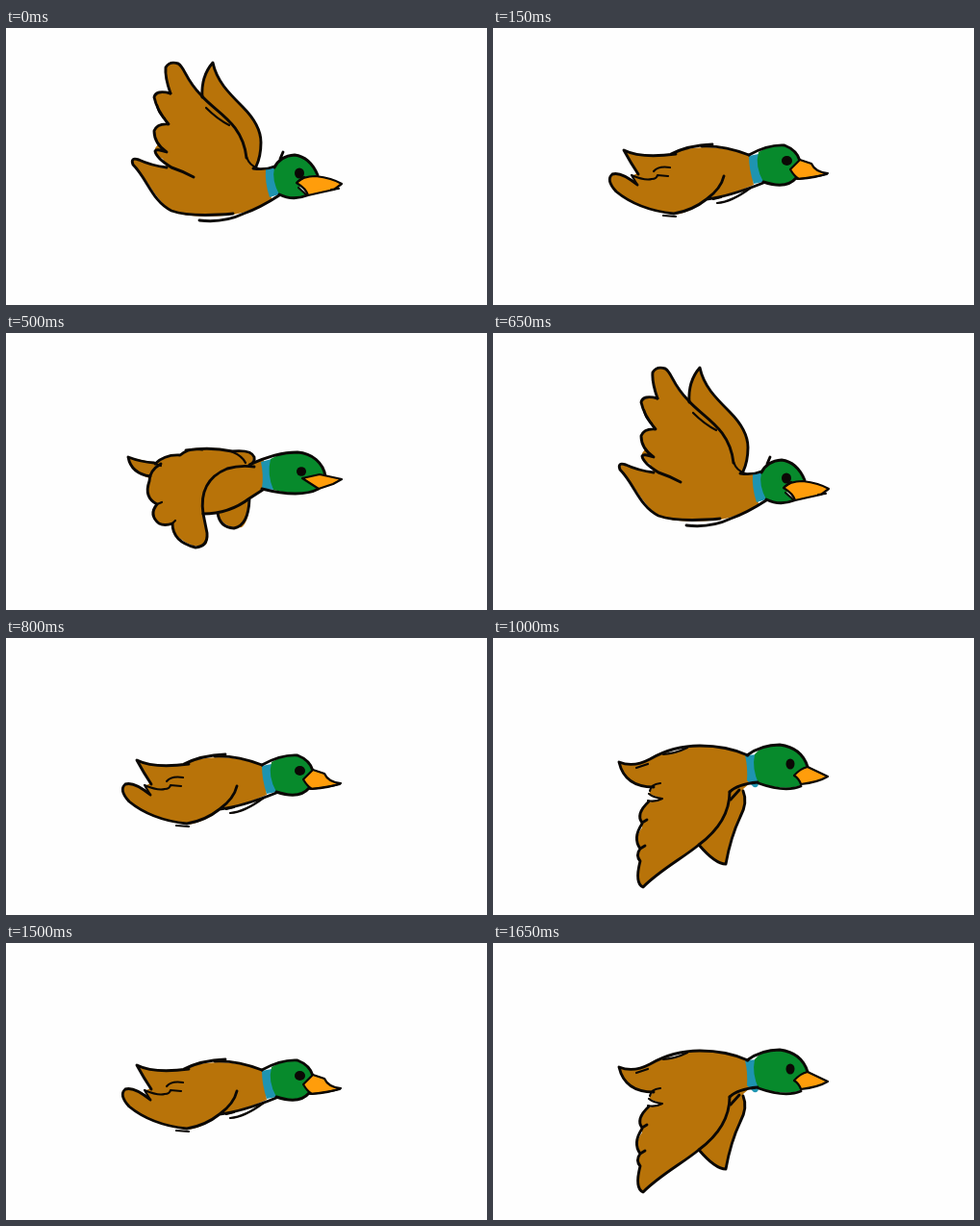
Recreate the animation shown at these times as an HTML page without scripts. Size 500x288 px, loop 1.8 s.

```html
<!DOCTYPE html>
<html lang="en">
<head>
<meta charset="utf-8">
<title>Flying duck</title>
<style>
html, body { margin: 0; width: 100%; height: 100%; overflow: hidden; background: #fefefe; }
svg { display: block; width: 100vw; height: 100vh; }
path { fill: none; stroke: none; }
.body { fill: #b87309; }
.head { fill: #078a2c; }
.ring { fill: #1e94b0; }
.bill { fill: #ff9d0b; }
.gap { fill: #fefefe; }
.ink, .bill { stroke: #0b0805; stroke-width: 2.9; stroke-linecap: round; stroke-linejoin: round; }
.bill { stroke-width: 2.2; }
.thin { stroke-width: 2.2; }
.eye { fill: #0b0805; }

/* Each pose is held, then cut to the next */
.pose { visibility: hidden; animation: 1.8s step-end infinite; }
.up { animation-name: up; }
.glide { animation-name: glide; }
.down { animation-name: down; }
.tuck { animation-name: tuck; }
@keyframes up {
  0%, 36.111%, 72.222% { visibility: visible; }
  8.333%, 44.444%, 83.333%, 100% { visibility: hidden; }
}
@keyframes glide {
  8.333%, 44.444%, 83.333% { visibility: visible; }
  0%, 16.666%, 55.555%, 91.666%, 100% { visibility: hidden; }
}
@keyframes down {
  16.666%, 55.555%, 91.666% { visibility: visible; }
  0%, 27.777%, 63.888%, 100% { visibility: hidden; }
}
@keyframes tuck {
  27.777%, 63.888% { visibility: visible; }
  0%, 36.111%, 72.222%, 100% { visibility: hidden; }
}
</style>
</head>
<body>
<svg viewBox="0 0 500 288" preserveAspectRatio="none">

  <g class="pose up">
    <path class="body" d="M215 36C219 55 231 67 246 82Q265 101 265 119Q265 133 260 146L272 147L276 178Q260 190 236 194Q196 199 174 191C157 182 149 159 132 143Q130 135 138 137Q152 143 167 145L163 136Q154 133 155 125L158 121Q152 109 157 101L168 100Q155 85 154 72Q156 66 171 68Q165 51 166 41Q170 34 179 37C186 41 184 53 204 72Q204 47 215 36Z"/>
    <path class="ring" d="M270 147L284 144V173L274 176Q269 161 270 147Z"/>
    <path class="head" d="M279 145Q285 133 300 132Q315 134 324 153L304 160L313 174Q301 181 284 173Q276 158 279 145Z"/>
    <path class="gap" d="M305 165L314 166L312 174Z"/>
    <path class="ink" d="M204 72C203 57 208 44 215 36C219 55 231 67 246 82Q265 101 265 119Q265 133 260 144"/>
    <path class="ink" d="M171 68Q165 51 166 41Q170 34 179 37C186 41 186 53 203 70C218 88 246 98 250 135"/>
    <path class="ink thin" d="M208 83Q220 95 232 101M250 134Q253 143 262 146"/>
    <path class="ink" d="M171 68Q156 64 154 72Q157 86 169 100Q157 99 154 107Q154 120 167 129Q156 125 155 128Q156 135 172 145Q184 149 195 155"/>
    <path class="ink thin" d="M157 80Q158 88 165 94"/>
    <path class="ink" d="M167 145Q151 143 138 137Q129 134 132 142C147 157 152 180 172 190Q192 197 236 193M201 200Q226 203 247 193Q264 187 284 174M257 146Q269 148 279 144"/>
    <path class="ink" d="M279 145Q285 133 300 132Q316 134 324 153M284 173Q298 180 313 174M285 136L288 129"/>
    <path class="bill" d="M302 161Q308 154 322 154Q339 156 349 162L341 168Q327 171 314 174Q312 167 302 161Z"/>
    <path class="ink thin" d="M304 166L313 174M338 168L346 167M303 160L310 155"/>
    <ellipse class="eye" cx="305" cy="151" rx="5" ry="5.5"/>
  </g>

  <g class="pose glide">
    <path class="body" d="M136 127Q159 137 187 130Q221 117 267 132L271 163Q247 174 222 178Q204 193 188 194Q151 189 128 170Q117 158 125 152Q132 149 150 163L144 154L150 151Q143 140 136 127Z"/>
    <path class="ring" d="M266 133L281 130V160L271 162Q266 147 266 133Z"/>
    <path class="head" d="M276 129Q289 121 303 122Q316 127 319 138L310 147L315 156Q308 166 281 160Q272 144 276 129Z"/>
    <path class="ink" d="M151 152Q143 140 136 127Q154 136 190 131M185 131Q203 122 228 121M217 123Q240 122 266 132"/>
    <path class="ink" d="M150 163Q133 149 124 152Q117 158 128 170Q151 189 188 193Q207 190 222 178Q237 167 240 154M222 178Q246 175 281 161"/>
    <path class="ink thin" d="M150 163L144 153Q158 159 165 157Q170 157 171 153L182 154M167 149Q172 143 184 145M177 195L190 196M233 182Q248 181 268 166M229 178L237 176"/>
    <path class="ink" d="M266 132Q286 121 303 122Q316 127 319 138M281 160Q305 168 315 156"/>
    <path class="bill" d="M309 147L319 137L331 141Q335 150 348 151Q336 156 318 157Q313 154 309 147Z"/>
    <path class="ink thin" d="M316 157Q334 155 347 152"/>
    <ellipse class="eye" cx="305.5" cy="138" rx="5.5" ry="5"/>
  </g>

  <g class="pose down">
    <path class="body" d="M131 129Q146 135 163 126Q187 112 215 112Q243 112 264 122L268 150L260 157Q265 171 257 186Q247 207 242 235Q231 235 214 215C193 231 177 238 157 259Q147 255 152 232Q148 226 153 219Q146 209 155 197Q149 183 162 171L176 167L162 162L166 155Q137 154 131 129Z"/>
    <path class="gap" d="M177 121Q190 114 202 114Q197 119 177 121Z"/>
    <path class="ring" d="M262 122L277 121L276 151Q276 156 271 155L264 148Q265 135 262 122Z"/>
    <path class="head" d="M272 121Q280 111 298 111Q321 114 327 134L314 143L321 152Q309 160 276 151Q269 136 272 121Z"/>
    <path class="ink" d="M167 155Q137 155 131 129Q146 135 163 126Q187 112 215 112Q243 112 265 122"/>
    <path class="ink thin" d="M149 135L161 131M177 121Q190 120 202 114M163 159Q164 152 174 151M162 162Q167 166 176 167Q168 171 161 169"/>
    <path class="ink" d="M162 170Q148 183 155 192L160 189M155 193Q145 208 153 219L158 216M153 219Q148 226 153 232Q147 255 156 259C174 241 197 229 214 215Q246 191 246 160"/>
    <path class="ink" d="M246 160Q254 152 275 150M260 159Q265 171 257 186Q247 207 242 235Q231 235 214 215M247 168L256 158"/>
    <path class="ink" d="M264 122Q279 111 298 111Q321 114 327 134M276 151Q304 161 320 154"/>
    <path class="bill" d="M313 143Q319 136 327 134L348 144Q338 150 320 152Q318 146 313 143Z"/>
    <ellipse class="eye" cx="309" cy="131" rx="4.5" ry="5.5"/>
  </g>

  <g class="pose tuck">
    <path class="body" d="M127 129L155 135Q165 126 181 127Q190 119 210 121L234 122Q255 121 258 129L255 136L268 132V163L253 172Q253 196 245 202Q225 204 220 187L205 188Q212 212 208 220Q192 226 176 209L173 198Q153 203 152 184L157 178Q143 172 149 151Q130 145 127 129Z"/>
    <path class="ring" d="M265 134L280 130V163L266 162Q268 148 265 134Z"/>
    <path class="head" d="M275 131C284 126 292 124 303 124C318 125 330 135 332 149L309 151L325 162Q310 171 278 163Q271 147 275 131Z"/>
    <path class="ink" d="M150 149Q130 146 127 129Q140 134 154 135M155 136Q165 126 181 127Q190 119 204 121M187 122Q212 118 235 123Q255 121 258 129Q259 134 254 137"/>
    <path class="ink" d="M161 136Q149 143 149 154Q143 171 157 178Q148 189 159 198Q165 201 173 198Q173 217 197 223Q210 222 209 208L205 188"/>
    <path class="ink" d="M205 188C202 168 208 150 230 141Q243 137 258 139M205 188Q232 188 253 172L267 163M220 187Q222 202 237 203Q252 200 253 173"/>
    <path class="ink thin" d="M234 123Q246 128 249 135M157 178L162 176M173 198L176 195M155 136L161 138"/>
    <path class="ink" d="M253 137C270 129 288 124 303 124C318 125 330 135 332 149M266 162Q306 172 325 162"/>
    <path class="bill" d="M308 151L326 147L349 152L340 157L325 162Z"/>
    <ellipse class="eye" cx="307" cy="144" rx="5" ry="4.8"/>
  </g>

</svg>
</body>
</html>
```
